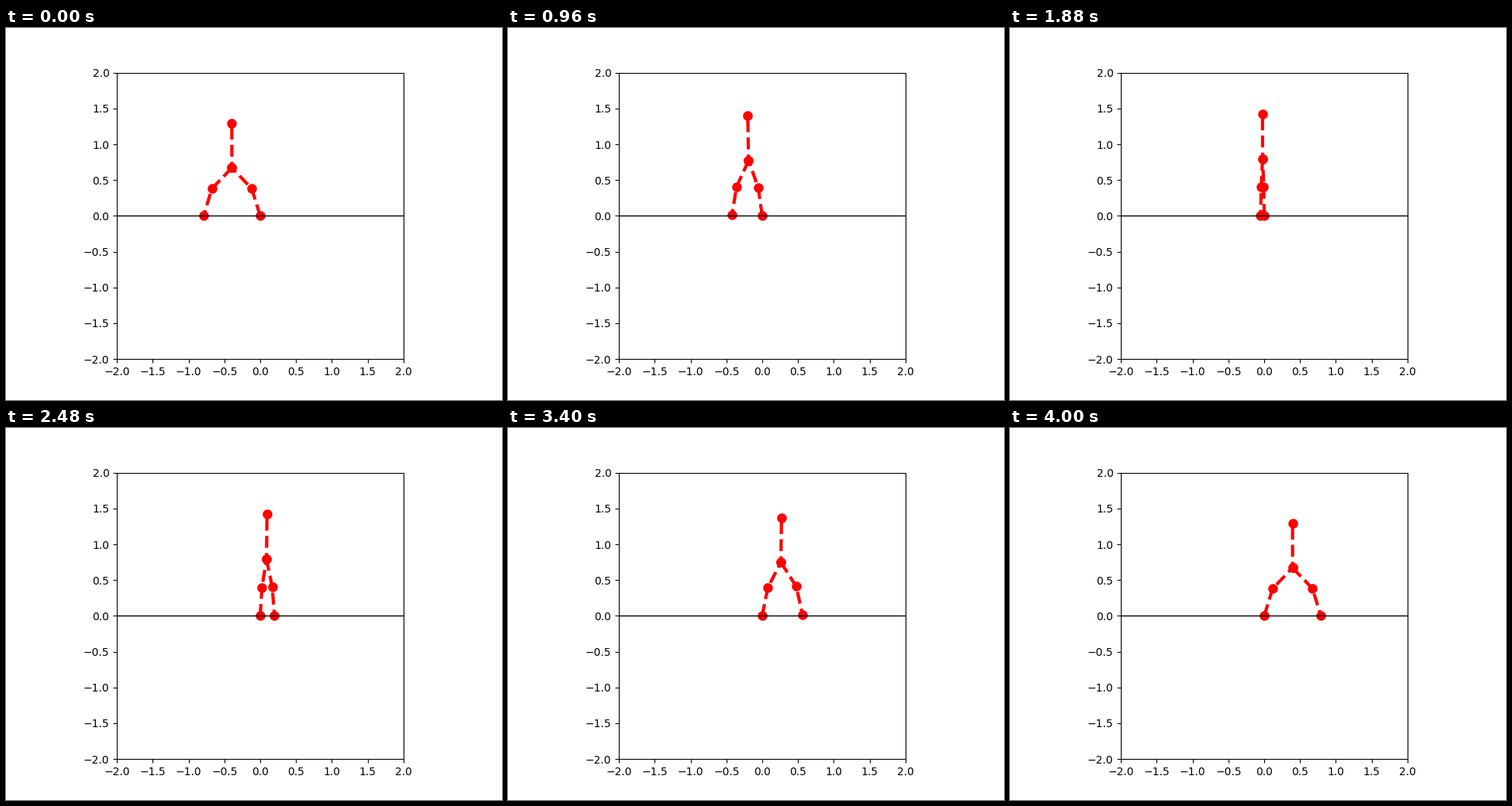
A matplotlib script for the animation above (4040 ms loop, 640x480 px).

```python
import numpy as np
import matplotlib.pyplot as plt
from matplotlib.animation import FuncAnimation

FRAMES = 101
SHIN, THIGH, TORSO = 0.4, 0.4, 0.625

fig, ax = plt.subplots(figsize=(6.4, 4.8), dpi=100)
ax.set_aspect("equal")
ax.set_xlim(-2, 2)
ax.set_ylim(-2, 2)
ax.set_xticks(np.arange(-2, 2.1, 0.5))
ax.set_yticks(np.arange(-2, 2.1, 0.5))

style = dict(color="red", marker="o", linestyle="--", linewidth=3, markersize=8)
body, = ax.plot([], [], **style)
swing, = ax.plot([], [], **style)
ax.axhline(0, color="black", linewidth=1)


def link(length, angle):
    """Vector of a link leaning right from the vertical."""
    return length * np.array([np.sin(angle), np.cos(angle)])


def pose(s):
    """Joint positions for gait phase s in [-1, 1]."""
    stance_shin = 0.26 * s + 0.042 * s**3
    stance_thigh = 0.65 * s + 0.115 * s**5
    swing_thigh = 0.85 * s - 0.085 * s**3
    swing_shin = 0.32 * s - 0.018 * s**3
    lean = 0.018 * np.sin(np.pi * s)

    foot = np.zeros(2)
    knee = foot + link(SHIN, stance_shin)
    hip = knee + link(THIGH, stance_thigh)
    head = hip + link(TORSO, lean)
    knee2 = hip - link(THIGH, -swing_thigh)
    foot2 = knee2 - link(SHIN, -swing_shin)
    return [foot, knee, hip, head], [hip, knee2, foot2]


def update(i):
    for line, joints in zip((body, swing), pose(2 * i / (FRAMES - 1) - 1)):
        line.set_data(*np.transpose(joints))
    return body, swing


anim = FuncAnimation(fig, update, frames=FRAMES, interval=40,
                     repeat=True, repeat_delay=0, blit=False)
plt.show()
```
